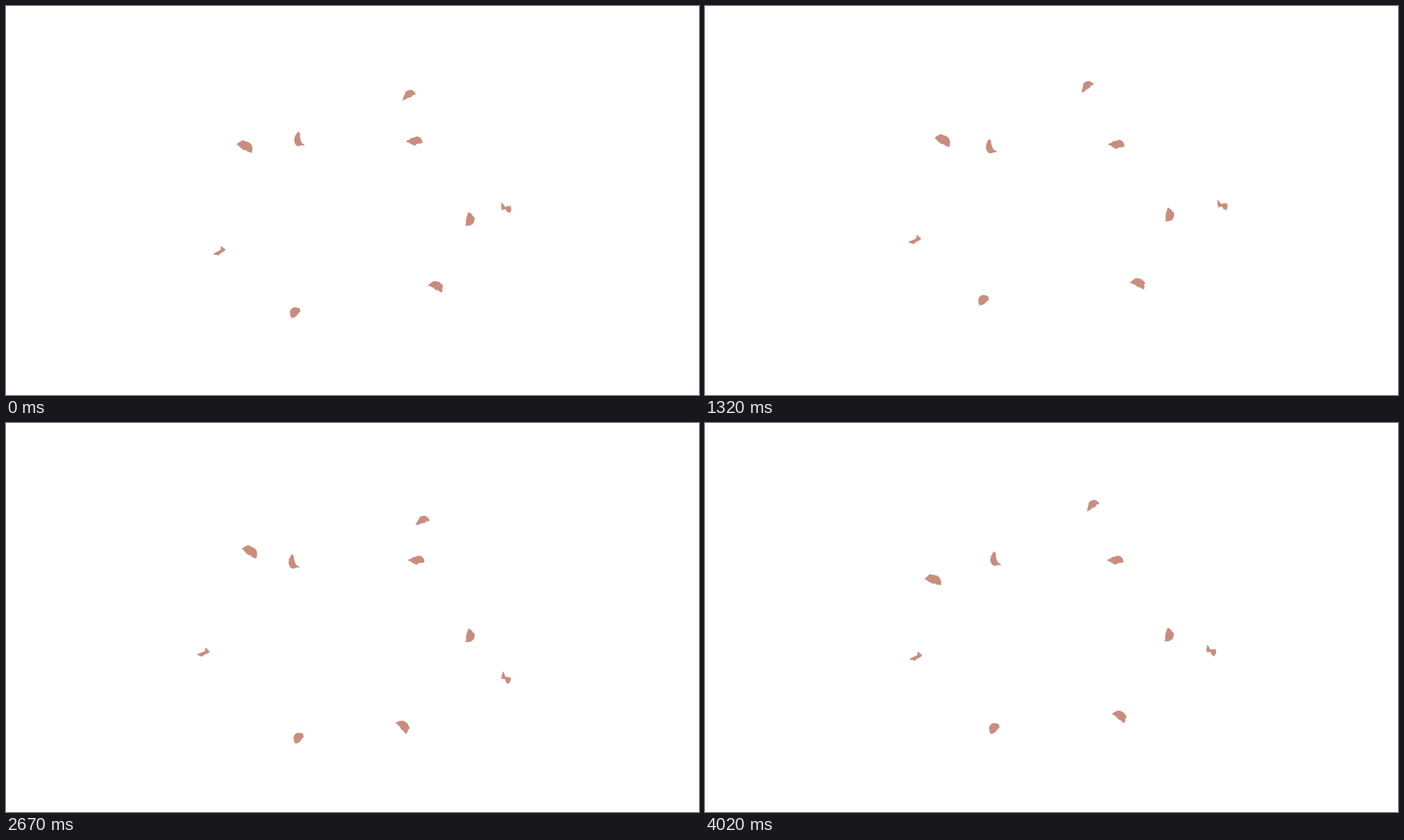
An HTML page that plays this animation: 998 px wide and 561 px high, repeating every 4.05 s.

```html
<!DOCTYPE html>
<html>
<head>
<meta charset="utf-8">
<style>
  html, body { margin: 0; width: 100%; height: 100%; overflow: hidden; background: #fff; }
  svg { display: block; width: 998px; height: 561px; fill: #c98d7d; }
</style>
</head>
<body>
<svg id="stage" viewBox="0 0 998 561"></svg>
<script>
const LOOP = 4050, STEP = 30, CX = 499, CY = 280.5;
const TIMES = [0, 540, 1320, 2130, 2670, 3540, 4020];
const stage = document.getElementById('stage');
const petals = [];

let seed = 7;
const random = () => (seed = seed * 16807 % 2147483647) / 2147483647;

// Straight line broken into short steps that stray to either side.
function tear([x0, y0], [x1, y1]) {
  const dx = x1 - x0, dy = y1 - y0, len = Math.hypot(dx, dy);
  const steps = Math.ceil(len / 2.5);
  let d = '';
  for (let i = 1; i <= steps; i++) {
    const u = i / steps, off = i < steps ? (random() - .5) * 2 / len : 0;
    d += `L${x0 + dx * u - dy * off} ${y0 + dy * u + dx * off}`;
  }
  return d;
}

// rim: start, control and end of the smooth side; torn: corners of the ragged side.
// turns: degrees around the stage centre; drift: distance outwards, both at TIMES after the first.
function petal(rim, torn, turns, drift = turns.map(() => 0)) {
  const [a, c, b] = rim;
  const edge = [b, ...torn, a];
  const el = document.createElementNS(stage.namespaceURI, 'path');
  el.setAttribute('d', `M${a}Q${c} ${b}` + edge.slice(1).map((p, i) => tear(edge[i], p)).join('') + 'z');
  stage.append(el);
  const heading = Math.atan2(c[1] - CY, c[0] - CX);
  petals.push({ el, heading, turns: [0, ...turns], drift: [0, ...drift] });
}

petal([[575, 124], [584, 117], [590, 126.5]], [[581, 132], [570, 137]],
  [-5.9, -10.8, 3, 7.8, -6.9, -8]);
petal([[592, 188], [599, 189], [600, 197]], [[587, 201], [576, 196], [583, 190.5]],
  [-1.4, 3, 0, 1.9, 6, 1.9]);
petal([[415, 194], [415, 198], [418, 201]], [[430, 201.5], [425, 195], [422, 181], [416, 187]],
  [-5.2, -7.3, -6.4, -5.6, -3.8, -2.8]);
petal([[344, 195], [358, 197], [354, 212]], [[344, 208], [331.5, 200], [341, 193.5]],
  [-9.8, 2.1, -7.6, 6, 1.6, -9.2], [8.4, 5.7, 12.3, 2.3, 19.1, 5.4]);
petal([[310, 346], [313, 349], [316.5, 351.5]], [[305, 360], [297, 358], [308, 352]],
  [9.2, 4.8, 2.5, 7.6, -.6, 4.8], [15.6, -.4, 3.2, 15.5, 5.2, -2]);
petal([[408.5, 442], [411, 431], [423, 436]], [[424, 440], [417, 448], [411, 451]],
  [7.5, 7.3, 6.3, -3.2, -2.2, .2], [-14.3, -7.5, 14.5, 8.9, 4.3, -1.5]);
petal([[609, 402], [616, 394], [623, 398]], [[629, 403], [628, 413], [617, 408], [607, 403.5]],
  [6.3, -2, 1.6, 19.4, 9.8, 9.6]);
petal([[675, 307], [674, 319], [661, 316.5]], [[663, 307], [667, 297], [674, 304]],
  [.7, -2.2, .2, -.3, -1.3, -.7]);
petal([[725.5, 287.5], [730, 292], [725, 299]], [[718, 293], [713, 294], [714, 283], [720, 290]],
  [8, -1.2, 7.8, 18.8, 12.1, 9], [18, 24.8, 23.4, 16.3, 5.3, 13.5]);

// Smooth curve through the values at TIMES.
function sample(values, t) {
  const last = TIMES.length - 1;
  const slope = i => {
    const a = Math.max(i - 1, 0), b = Math.min(i + 1, last);
    return (values[b] - values[a]) / (TIMES[b] - TIMES[a]);
  };
  let i = 0;
  while (i < last - 1 && t >= TIMES[i + 1]) i++;
  const span = TIMES[i + 1] - TIMES[i];
  const u = (t - TIMES[i]) / span, v = 1 - u;
  return v * v * ((1 + 2 * u) * values[i] + u * span * slope(i))
       + u * u * ((3 - 2 * u) * values[i + 1] - v * span * slope(i + 1));
}

function draw(now) {
  const t = Math.floor(now % LOOP / STEP) * STEP;
  for (const { el, heading, turns, drift } of petals) {
    const out = sample(drift, t);
    el.setAttribute('transform', `rotate(${sample(turns, t)} ${CX} ${CY}) ` +
      `translate(${out * Math.cos(heading)} ${out * Math.sin(heading)})`);
  }
}

let start;
function tick(now) {
  start ??= now;
  draw(now - start);
  requestAnimationFrame(tick);
}
draw(0);
requestAnimationFrame(tick);
</script>
</body>
</html>
```
